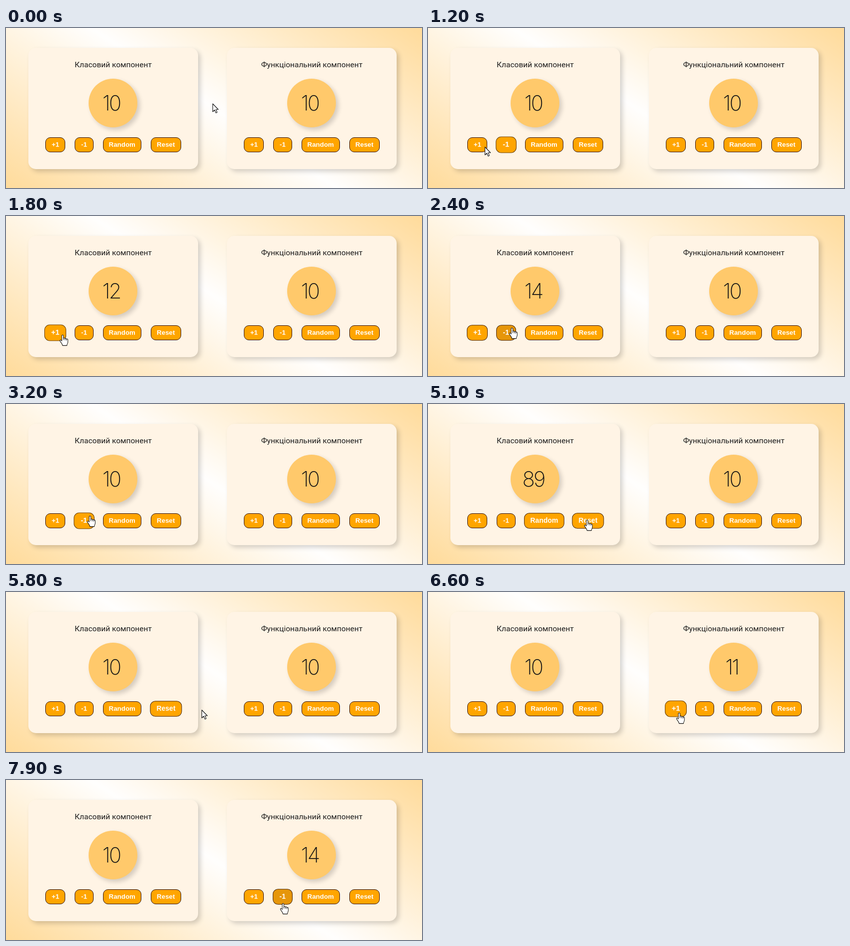
Write an HTML page that moves like this. It is 836 px wide and 322 px high and loops after 8 s.

```html
<!DOCTYPE html>
<html lang="uk">
<head>
<meta charset="utf-8">
<title>Лічильник</title>
<style>
  html, body { margin: 0; width: 100%; height: 100%; overflow: hidden; }
  #stage {
    position: relative; width: 836px; height: 322px; overflow: hidden;
    background: linear-gradient(33deg, #ffdb9b, #fffefd 50%, #ffdb9b);
  }
  .card, .title, .count, .row, #cursor { position: absolute; box-sizing: border-box; }
  .card {
    top: 40px; width: 341px; height: 244px; border-radius: 15px;
    background: #fff4e5; box-shadow: 5px 5px 10px rgba(0, 0, 0, .17);
  }
  .title {
    top: 24px; width: 100%; text-align: center; color: #1c1c1c;
    font: 15.5px/20px Roboto, sans-serif;
  }
  .count {
    left: 121px; top: 62px; width: 98px; height: 98px; border-radius: 50%;
    background: #ffc96b; box-shadow: 5px 5px 10px rgba(0, 0, 0, .17);
    font: 200 42px/98px Inter, Lato, sans-serif; letter-spacing: -3px;
    padding-right: 7px; text-align: center; color: #161616;
  }
  .row {
    top: 180px; width: 100%; display: flex; justify-content: center; gap: 19px;
  }
  .btn {
    box-sizing: border-box; height: 30px; border: 1px solid; border-radius: 10px;
    font: bold 13.333px/28px "Liberation Sans", Arial, sans-serif;
    text-align: center; color: #fff; white-space: nowrap;
  }
  #cursor { left: 0; top: 0; width: 30px; height: 30px; overflow: visible; }
</style>
</head>
<body>
<div id="stage"></div>
<script>
const LOOP = 8000, STEP = 100, START = 10;

const CARDS = [
  { x: 45, title: 'Класовий компонент' },
  { x: 444, title: 'Функціональний компонент' }
];

const BUTTONS = [
  { label: '+1', width: 40, next: v => v + 1 },
  { label: '-1', width: 37.5, next: v => v - 1 },
  { label: 'Random', width: 77, next: v => (v * 6 + 47) % 100 },
  { label: 'Reset', width: 61, next: () => START }
];

// Where the pointer rests; it glides from one stop to the next.
const STOPS = [
  { from: 0, to: 400, x: 415, y: 152 },
  { from: 900, to: 1050, x: 160, y: 238 },
  { from: 1200, to: 2200, x: 114, y: 239 },
  { from: 2400, to: 3300, x: 169, y: 225 },
  { from: 3700, to: 4800, x: 252, y: 232 },
  { from: 5100, to: 5500, x: 320, y: 233 },
  { from: 6200, to: 7500, x: 505, y: 243 },
  { from: 7900, to: 8000, x: 557, y: 248 }
];

// Runs of evenly spaced clicks; a value changes when the button is released.
const CLICKS = [
  { card: 0, button: 0, first: 1600, every: 200, times: 4 },
  { card: 0, button: 1, first: 2500, every: 200, times: 4 },
  { card: 0, button: 2, first: 3900, every: 300, times: 2 },
  { card: 0, button: 3, first: 5300, every: 0, times: 1 },
  { card: 1, button: 0, first: 6400, every: 350, times: 4 },
  { card: 1, button: 1, first: 8000, every: 0, times: 1 }
].flatMap(run => Array.from({ length: run.times },
  (_, i) => ({ card: run.card, button: run.button, release: run.first + i * run.every })));

const stage = document.getElementById('stage');

function add(parent, cls, text = '') {
  const el = document.createElement('div');
  el.className = cls;
  el.textContent = text;
  parent.append(el);
  return el;
}

const counts = [], buttons = [];
CARDS.forEach(({ x, title }, card) => {
  const box = add(stage, 'card');
  box.style.left = x + 'px';
  add(box, 'title', title);
  counts.push(add(box, 'count'));
  const row = add(box, 'row');
  BUTTONS.forEach(({ label, width }, button) => {
    const el = add(row, 'btn', label);
    el.style.width = width + 'px';
    buttons.push({ el, card, button, x, width });
  });
});
for (const b of buttons) b.left = b.x + b.el.offsetLeft;

stage.insertAdjacentHTML('beforeend', `
  <svg id="cursor" fill="#fff" stroke="#111" stroke-width="1.1" stroke-linejoin="round">
    <path id="arrow" d="M.5 .5V16.5L4.2 13L6.8 18.9L9.3 17.8L6.8 12H11.6Z"/>
    <g id="hand" transform="scale(.92)">
      <path d="M-2 2C-2 -.1 1.6 -.1 1.6 2V8C2 6.6 5 6.8 5 8.6C5.6 7.3 8.2 7.8 8.2 9.6
        C9 8.7 11.2 9.2 11.2 11V16C11.2 19 9.2 20 9.2 23.5H-.4C-.8 20 -3 18.5 -5.6 14
        C-7 11.7 -4.6 10.6 -3.2 12.2L-2 13.6Z"/>
      <path fill="none" d="M1.6 8V11.5M5 8.6V12M8.2 9.6V12.5"/>
    </g>
  </svg>`);
const cursor = document.getElementById('cursor');
const arrow = document.getElementById('arrow');
const hand = document.getElementById('hand');

const mix = (a, b, p) => a + (b - a) * p;
const mixColor = (a, b, p) => `rgb(${a.map((v, i) => mix(v, b[i], p))})`;
const ease = p => p * p * (3 - 2 * p);

function pointer(t) {
  const i = STOPS.findLastIndex(s => s.from <= t);
  const a = STOPS[i], b = STOPS[i + 1];
  if (!b || t <= a.to) return a;
  const p = ease((t - a.to) / (b.from - a.to));
  return { x: mix(a.x, b.x, p), y: mix(a.y, b.y, p) };
}

function hovered(t) {
  const { x, y } = pointer(Math.max(0, t));
  return buttons.find(b => x > b.left && x < b.left + b.width && y > 219 && y < 251);
}

// Hover follows the pointer one step late and takes two steps to grow or fade.
for (const b of buttons) {
  b.levels = [];
  let level = 0;
  for (let t = 0; t < LOOP; t += STEP) {
    level += hovered(t - STEP) === b ? .5 : -.5;
    level = Math.min(1, Math.max(0, level));
    b.levels.push(level);
  }
}

function render(time) {
  const frame = Math.floor(time % LOOP / STEP), t = frame * STEP;

  const values = CARDS.map(() => START);
  for (const c of CLICKS) {
    if (c.release <= t) values[c.card] = BUTTONS[c.button].next(values[c.card]);
  }
  counts.forEach((el, card) => { el.textContent = values[card]; });

  for (const { el, card, button, levels } of buttons) {
    const level = levels[frame];
    const pressed = CLICKS.some(c => c.card === card && c.button === button
      && t >= c.release - STEP && t < c.release);
    el.style.transform = level ? `scale(${1 + level * .1})` : 'none';
    el.style.background = pressed ? '#e6960a' : '#ffa500';
    el.style.borderColor = mixColor([42, 12, 16], [110, 68, 10], level);
  }

  // The hand appears after a full step on the same button.
  const over = hovered(t);
  const pointing = over && over === hovered(t - STEP);
  arrow.style.display = pointing ? 'none' : '';
  hand.style.display = pointing ? '' : 'none';
  const { x, y } = pointer(t);
  cursor.style.transform = `translate(${Math.round(x)}px, ${Math.round(y)}px)`;
}

const start = performance.now();
function tick() {
  render(performance.now() - start);
  requestAnimationFrame(tick);
}
tick();
</script>
</body>
</html>
```
